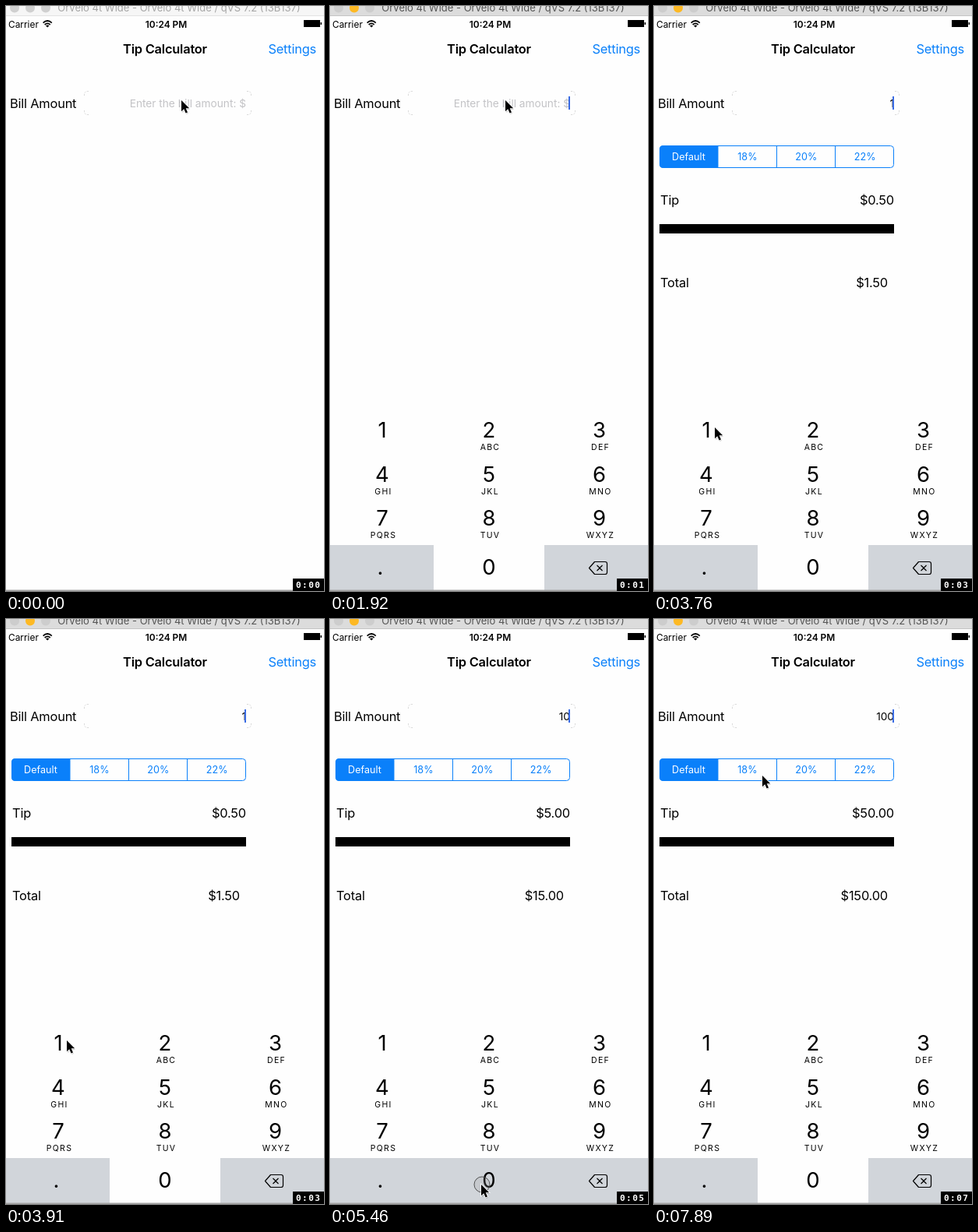
An HTML page for the animation above (8000 ms loop, 408 px wide and 751 px high).

```html
<!DOCTYPE html>
<html lang="en">
<head>
<meta charset="utf-8">
<title>Tip Calculator</title>
<style>
  html, body { margin: 0; width: 100%; height: 100%; overflow: hidden; background: #fefefe; }
  svg { display: block; width: 100%; height: 100%; }
  text { font-family: Inter, Roboto, sans-serif; white-space: pre; }
  .body { font-size: 16.4px; letter-spacing: -.2px; }
  .bold { font-weight: 600; }
  .status { font-size: 11.9px; }
  .field { font-size: 13.7px; }
  .segment { font-size: 12.6px; }
  .digit { font-size: 27.5px; }
  .letters { font-size: 10.5px; letter-spacing: 1.3px; }
  .timer { font: bold 11px "DejaVu Sans Mono", monospace; letter-spacing: 1.5px; }
  .mid { text-anchor: middle; }
  .end { text-anchor: end; }
</style>
</head>
<body>
<svg viewBox="0 0 408 751">
  <rect width="408" height="751" fill="#fefefe"/>

  <g id="titleBar">
    <rect id="barFill" width="408" height="12"/>
    <circle class="light" cx="11" cy="2.5" r="6"/>
    <circle id="minimise" cx="31" cy="2.5" r="6"/>
    <circle class="light" cx="51" cy="2.5" r="6"/>
    <text id="windowTitle" class="mid" x="222" y="7" font-size="13">Orvelo 4t Wide - Orvelo 4t Wide / qVS 7.2 (13B137)</text>
    <path id="barEdge" d="M0 12.5H408"/>
  </g>

  <text class="status" x="3" y="27.5">Carrier</text>
  <g fill="none" stroke="#000" stroke-width="1.7">
    <path d="M47.6 21.6Q53.2 16.4 58.8 21.6M49.7 24Q53.2 20.8 56.7 24"/>
    <path d="M53.2 27.6L51 25.3Q53.2 23.5 55.4 25.3Z" fill="#000" stroke="none"/>
  </g>
  <text class="status bold mid" x="205.5" y="27.5">10:24 PM</text>
  <path d="M382 18h21v9h-21zM403.6 21h1.4v3h-1.4z"/>

  <text class="body bold mid" x="204" y="61">Tip Calculator</text>
  <text class="body end" x="398" y="61" fill="#0a80fa">Settings</text>

  <text class="body" x="5" y="131">Bill Amount</text>
  <path d="M100.5 115v-1q0-4.5 4.5-4.5h1M309 109.5h1q4.5 0 4.5 4.5v1M314.5 134v1q0 4.5-4.5 4.5h-1M106 139.5h-1q-4.5 0-4.5-4.5v-1"
        fill="none" stroke="#d4d4d4" stroke-dasharray="2 1.5"/>
  <text id="bill" class="field end" x="308" y="129.5"></text>
  <rect id="caret" x="306" y="116" width="2" height="17" fill="#3a6ce4"/>

  <g id="results">
    <g id="segments" stroke="#0a80fa"></g>
    <text class="body" x="8" y="255">Tip</text>
    <text id="tip" class="body end" x="308" y="255"></text>
    <rect x="7" y="280" width="301" height="12"/>
    <text class="body" x="8" y="361">Total</text>
    <text id="total" class="body end" x="300" y="361"></text>
  </g>

  <g id="keyboard"></g>

  <rect y="749.5" width="408" height="1.5" fill="#a4a4a4"/>
  <circle id="touch" r="10" fill="#999" fill-opacity=".2" stroke="#444" stroke-width=".9"/>
  <g id="pointer">
    <path d="M1 2V16L4.3 13L6.5 18L9 17L6.7 12H11Z" opacity=".18"/>
    <path d="M0 0V14.2L3.3 11.2L5.6 16.4L8 15.4L5.7 10.3H10.2Z" stroke="#fff" stroke-width="1.6" paint-order="stroke"/>
  </g>
  <rect x="368" y="735" width="40" height="16"/>
  <text id="timer" class="timer" x="372" y="746.5" fill="#fff"></text>
</svg>

<script>
const $ = id => document.getElementById(id);
const LOOP = 8000;
const GREY = '#d1d5da';
const BLINK = 500;
const KEYBOARD_START = 1345, KEYBOARD_HEIGHT = 233;

const secondMarks = [900, 2030, 3060, 4060, 5210, 6060, 7050];
const presses = [
  { from: 1190, to: 1440 },
  { from: 3610, to: 3760, key: '1' },
  { from: 5060, to: 5200, key: '0' },
  { from: 5400, to: 5600, key: '0' },
];
const TOUCH_TIME = 150;
// [time, x, y]
const pointerPath = [
  [2050, 225, 121], [2760, 116, 532], [2910, 115, 535], [3310, 78, 541],
  [4010, 78, 541], [4610, 192, 724], [4760, 194, 726],
  [6560, 194, 727], [7050, 154, 330], [7450, 139, 203], [7890, 139, 201],
];

function buildSegments() {
  let out = '<rect x="7.5" y="179.5" width="300" height="28" rx="4" fill="none"/>' +
    '<path d="M82 179.5H11.5q-4 0-4 4v20q0 4 4 4H82Z" fill="#0a80fa"/>' +
    '<path d="M157.5 180v27M232.5 180v27"/>';
  ['Default', '18%', '20%', '22%'].forEach((label, i) => {
    out += `<text class="segment mid" x="${44.5 + 75.4 * i}" y="198" stroke="none" fill="${i ? '#0a80fa' : '#fff'}">${label}</text>`;
  });
  $('segments').innerHTML = out;
}

function buildKeyboard() {
  const edges = [0, 133, 275, 408], centres = [67, 204, 345.5];
  const letters = ['', 'ABC', 'DEF', 'GHI', 'JKL', 'MNO', 'PQRS', 'TUV', 'WXYZ'];
  let out = '';
  ['1', '2', '3', '4', '5', '6', '7', '8', '9', '.', '0', ''].forEach((key, i) => {
    const col = i % 3, row = Math.floor(i / 3);
    const top = Math.round(522 + 56.6 * row);
    const fill = i === 9 || i === 11 ? GREY : '#fefefe';
    const x = key === '.' ? 64.5 : centres[col];
    out += `<rect id="key${key}" x="${edges[col]}" y="${top}" width="${edges[col + 1] - edges[col]}" height="${row === 3 ? 60 : 57}" fill="${fill}"/>`;
    out += `<text class="digit mid" x="${x}" y="${row === 3 ? 730 : top + 32}">${key}</text>`;
    out += `<text class="letters mid" x="${x + 1.5}" y="${top + 48}">${letters[i] || ''}</text>`;
  });
  out += '<path d="M339.5 713.5H353q2.5 0 2.5 2.5v11q0 2.5-2.5 2.5H339.5L332.5 721.5Z' +
    'M342.5 718l7 7M349.5 718l-7 7" fill="none" stroke="#000" stroke-width="1.2" stroke-linejoin="round"/>';
  $('keyboard').innerHTML = out;
}

function pointerAt(t) {
  const next = pointerPath.findIndex(p => p[0] > t);
  if (next === 0) return pointerPath[0].slice(1);
  if (next < 0) return pointerPath[pointerPath.length - 1].slice(1);
  const [t0, x0, y0] = pointerPath[next - 1], [t1, x1, y1] = pointerPath[next];
  const u = (t - t0) / (t1 - t0), k = u * u * (3 - 2 * u);
  return [x0 + (x1 - x0) * k, y0 + (y1 - y0) * k].map(Math.round);
}

// Critically damped spring
function keyboardOffset(t) {
  const s = Math.max(0, t - KEYBOARD_START) * 0.0183;
  return Math.round(KEYBOARD_HEIGHT * (1 + s) * Math.exp(-s));
}

function setWindowActive(active) {
  $('barFill').setAttribute('fill', active ? '#dcdcdc' : '#f6f6f6');
  $('barEdge').setAttribute('stroke', active ? '#c4c4c4' : '#e2e2e2');
  $('windowTitle').setAttribute('fill', active ? '#555' : '#a5a5a5');
  $('minimise').setAttribute('fill', active ? '#fdb924' : '#d0d0d0');
  document.querySelectorAll('.light').forEach(c => c.setAttribute('fill', active ? '#cdcdcd' : '#d0d0d0'));
}

const show = (id, visible) => $(id).setAttribute('visibility', visible ? 'visible' : 'hidden');
const move = (id, x, y) => $(id).setAttribute('transform', `translate(${x} ${y})`);

function render(t) {
  const done = presses.filter(p => t >= p.to);
  const current = presses.find(p => t >= p.from && t < p.to);
  const amount = done.map(p => p.key || '').join('');

  setWindowActive(t >= presses[0].from);

  $('bill').textContent = amount || 'Enter the bill amount: $';
  $('bill').setAttribute('fill', amount ? '#000' : '#c3c3c6');
  show('results', amount);
  $('tip').textContent = '$' + (amount * 0.5).toFixed(2);
  $('total').textContent = '$' + (amount * 1.5).toFixed(2);

  const lastInput = done.length ? done[done.length - 1].to : Infinity;
  show('caret', t >= lastInput && Math.floor((t - lastInput) / BLINK) % 2 === 0);

  move('keyboard', 0, keyboardOffset(t));
  for (const key of ['1', '0'])
    $('key' + key).setAttribute('fill', current && current.key === key ? GREY : '#fefefe');

  const [x, y] = pointerAt(t);
  move('pointer', x, y);
  move('touch', x + 1, y);
  show('touch', current && t < current.from + TOUCH_TIME);

  $('timer').textContent = '0:0' + secondMarks.filter(mark => t >= mark).length;
}

buildSegments();
buildKeyboard();
const start = performance.now();
function tick() {
  render((performance.now() - start) % LOOP);
  requestAnimationFrame(tick);
}
tick();
</script>
</body>
</html>
```
